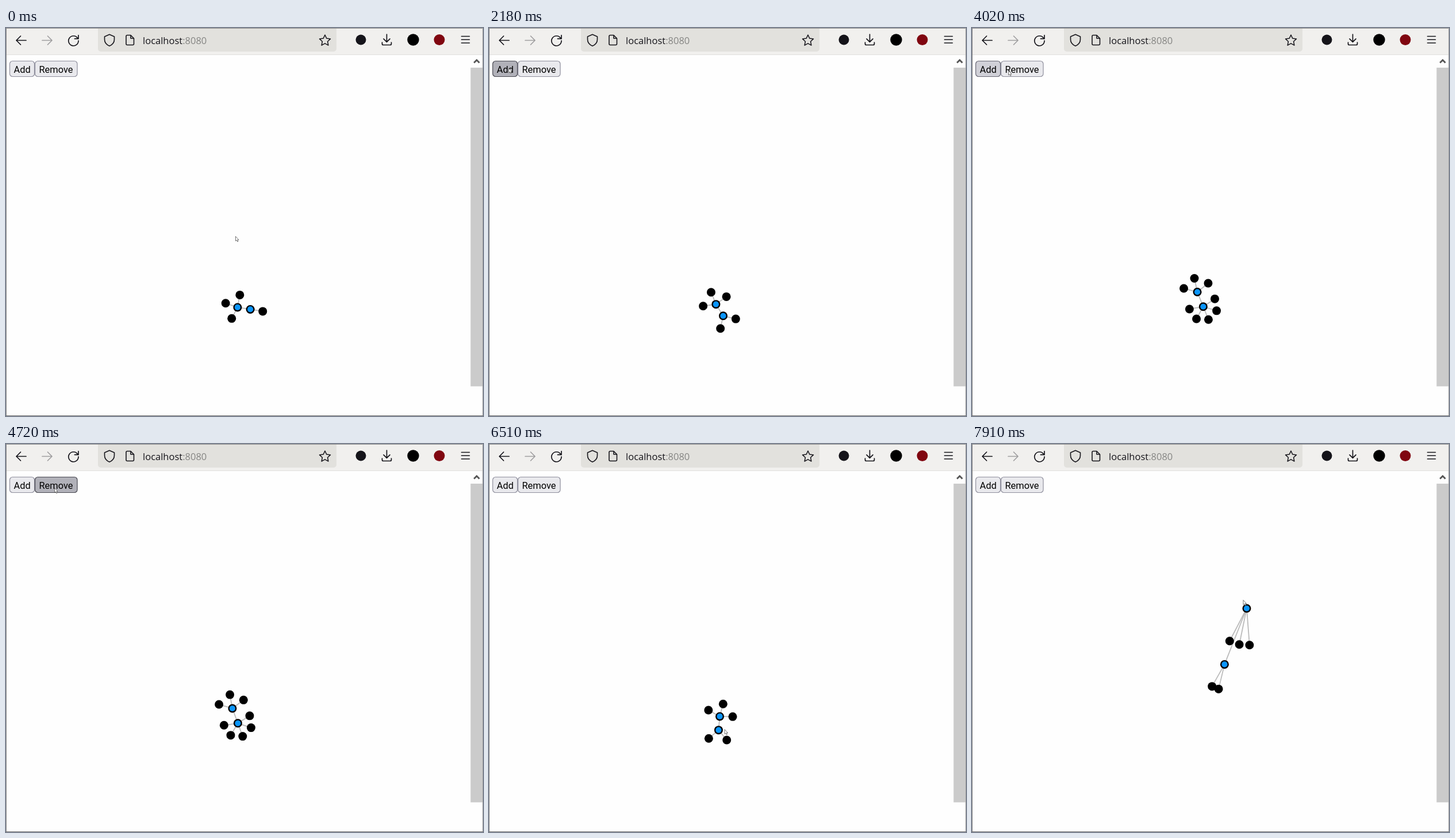
Animation of 830x675 px, one loop 8 s. Source, as an HTML page with a canvas:

```html
<!DOCTYPE html>
<html lang="en">
<head>
<meta charset="utf-8">
<title>Graph</title>
<style>
html, body { margin: 0; width: 100%; height: 100%; overflow: hidden; background: #fefefe; }
canvas { display: block; width: 830px; height: 675px; }
</style>
</head>
<body>
<canvas id="stage" width="830" height="675"></canvas>
<script>
const ctx = document.getElementById('stage').getContext('2d');
const LOOP = 8000;
const STEP = 141;    // usual time between two pictures
const PRESS = 135;   // how long a button stays down
const SETTLE = 400;  // how long neighbours take to make or close a gap
const DRAG = 7630;   // the pull on the first hub starts
const INK = '#15141a';

// Pair of hubs: time, middle x, middle y, direction in degrees
const POSES = [
  [0, 414, 487.7, 9],
  [150, 414, 487.7, 9],
  [2180, 401.2, 490.7, 58],
  [3000, 393.7, 484.5, 64.5],
  [4020, 397.2, 472, 68],
  [5290, 400.5, 474, 72],
  [6510, 400.5, 485.8, 95],
  [DRAG, 388, 474, 88],
  [7910, 458.7, 334.7, 111.6]
];

// Pointer: time, x, y
const POINTER = [
  [150, 399, 362],
  [1070, 34, 69],
  [3660, 34, 70],
  [4310, 84, 76],
  [5850, 84, 76],
  [6510, 409.5, 496],
  [DRAG, 386, 458],
  [7910, 471.5, 271]
];

const ADD = { x: 6.5, w: 43, label: 'Add', from: 1000, to: 4150, clicks: [1340, 2180, 2855, 3380] };
const REMOVE = { x: 50.5, w: 73.5, label: 'Remove', from: 4150, to: 5990, clicks: [4580, 4990, 5550] };

const leaf = (add, remove) => ({
  born: add === undefined ? -LOOP : ADD.clicks[add] + PRESS,
  dies: remove === undefined ? 2 * LOOP : REMOVE.clicks[remove] + PRESS
});

// Leaves are listed clockwise
const HUBS = [
  { side: -1, turn: 10, trail: 64, leaves: [leaf(), leaf(), leaf()] },
  { side: 1, turn: 0, trail: 44, leaves: [leaf(3, 0), leaf(), leaf(0), leaf(2, 1), leaf(1, 2)] }
];

const clamp = k => Math.min(1, Math.max(0, k));
const mix = (a, b, k) => a + (b - a) * k;
const linear = k => k;
const smooth = k => k * k * (3 - 2 * k);
const sum = list => list.reduce((a, b) => a + b, 0);

// Even steps between poses
function stepTime(t) {
  const i = POSES.findIndex(p => p[0] > t);
  if (i < 0) return POSES.at(-1)[0];
  const start = POSES[i - 1][0], span = POSES[i][0] - start;
  const d = span / Math.round(span / STEP);
  return start + Math.floor((t - start) / d + 1e-6) * d;
}

function between(keys, t, ease = linear) {
  const i = keys.findIndex(k => k[0] > t);
  if (i < 0) return keys.at(-1).slice(1);
  if (i === 0) return keys[0].slice(1);
  const a = keys[i - 1], b = keys[i];
  const k = ease((t - a[0]) / (b[0] - a[0]));
  return a.slice(1).map((v, j) => mix(v, b[j + 1], k));
}

function polar([x, y], r, deg) {
  const a = deg * Math.PI / 180;
  return [x + r * Math.cos(a), y + r * Math.sin(a)];
}

// Share of a slot that a leaf takes up
const weight = (l, t) => clamp((t - l.born) / SETTLE) * (1 - clamp((t - l.dies) / SETTLE));

function layout(t) {
  const [mx, my, axis] = between(POSES, t);
  const pull = clamp((t - DRAG) / (7910 - DRAG));
  const weights = HUBS.map(h => h.leaves.map(l => weight(l, t)));
  const counts = weights.map(sum);
  const total = sum(counts);
  const gap = 17.5 + 1.25 * total + 81 * pull;
  const reach = 19.5 + 0.6 * total;

  return HUBS.map((h, i) => {
    const at = polar([mx, my], h.side * gap / 2, axis);
    const out = axis + (h.side < 0 ? 180 : 0) + h.turn;
    const spread = 360 / (counts[i] + 1.1 + 0.32 * counts[1 - i]);
    let before = -counts[i] / 2;
    const leaves = [];
    h.leaves.forEach((l, j) => {
      const w = weights[i][j], slot = before + w / 2;
      before += w;
      if (t < l.born || t >= l.dies) return;
      // A fan at rest; leaves trail behind while pulled
      const fan = polar(at, reach, out + spread * slot);
      const tail = polar(at, h.trail, axis + h.side * (h.turn + 16 * slot));
      leaves.push(fan.map((v, n) => mix(v, tail[n], pull)));
    });
    return { at, leaves };
  });
}

function rect(x, y, w, h, color) {
  ctx.fillStyle = color;
  ctx.fillRect(x, y, w, h);
}

function disc([x, y], r, color) {
  ctx.fillStyle = color;
  ctx.beginPath();
  ctx.arc(x, y, r, 0, 7);
  ctx.fill();
}

function stroke(d, color = INK, width = 1.7) {
  ctx.strokeStyle = color;
  ctx.lineWidth = width;
  ctx.stroke(new Path2D(d));
}

function text(s, x, y, font, color) {
  ctx.font = font;
  ctx.fillStyle = color;
  ctx.fillText(s, x, y);
  return x + ctx.measureText(s).width;
}

function star(center, r) {
  const points = Array.from({ length: 10 }, (_, i) => polar(center, i % 2 ? r * 0.48 : r, i * 36 - 90));
  return `M${points.join('L')}Z`;
}

function drawBrowser() {
  rect(0, 0, 830, 675, '#fefefe');
  rect(0, 0, 830, 46, '#f1f0ee');
  rect(0, 46, 830, 1, '#e0dfde');
  ctx.fillStyle = '#e2e1dd';
  ctx.beginPath();
  ctx.roundRect(160, 1, 415, 40, [0, 0, 5, 5]);
  ctx.fill();

  ctx.lineCap = ctx.lineJoin = 'round';
  stroke('M35 21.5H18M25.5 14L18 21.5L25.5 29');
  stroke('M63 21.5H80M72.5 14L80 21.5L72.5 29', '#a09fa0');
  stroke('M124.5 17.5A8.6 8.6 0 1 0 126 22M126 12.5V18.7H119.5');
  stroke('M180 11.2L188.5 15V20C188.5 25 185.3 29 180 31.2C174.7 29 171.5 25 171.5 20V15Z', INK, 1.6);
  stroke('M211 12.5H217L222.5 18V27.5Q222.5 29.5 220.5 29.5H211Q209 29.5 209 27.5V14.5Q209 12.5 211 12.5M217 12.5V18H222.5', INK, 1.6);
  stroke(star([555, 22], 10), INK, 1.5);
  stroke('M662.5 11V24M657 18.8L662.5 24.3L668 18.8M654.5 25V27.5Q654.5 29.5 656.5 29.5H668.5Q670.5 29.5 670.5 27.5V25');
  for (const y of [14.5, 20.3, 26]) stroke(`M792.5 ${y}H806.5`, INK, 1.6);
  disc([617.5, 20.5], 9, INK);
  disc([708.5, 20.5], 10.2, '#000');
  disc([754, 20.5], 9.5, '#800610');

  const font = '16.5px "Open Sans", "Noto Sans", sans-serif';
  const x = text('localhost', 238, 27.5, font, INK);
  text(':8080', x, 27.5, font, '#858583');

  rect(808.4, 69, 21, 554.4, '#cbcbcb');
  ctx.lineCap = 'butt';
  ctx.lineJoin = 'miter';
  stroke('M814.3 60.5L819 55.7L823.7 60.5', '#555', 2.8);
}

function drawFrame() {
  rect(0, 0, 830, 1, '#8b8b8b');
  rect(0, 0, 1, 675, '#858585');
  rect(829, 0, 1, 675, '#a5a5a5');
  rect(0, 674, 830, 1, '#6c6c6c');
}

function drawButton(b, t) {
  const down = b.clicks.some(c => t >= c && t < c + PRESS);
  const over = t >= b.from && t < b.to;
  ctx.fillStyle = down ? '#b1b1b9' : over ? '#d0d0d7' : '#e9e9ed';
  ctx.strokeStyle = down ? '#484851' : over ? '#676774' : '#8f8f9d';
  ctx.lineWidth = 1.2;
  ctx.beginPath();
  ctx.roundRect(b.x, 57.5, b.w, 27, 5);
  ctx.fill();
  ctx.stroke();
  text(b.label, b.x + 7, 77.7, '16.4px Roboto, "Open Sans", sans-serif', '#000');
}

function drawGraph(t) {
  const hubs = layout(t);
  const link = (a, b) => stroke(`M${a}L${b}`, '#bbb', 1.8);
  link(hubs[0].at, hubs[1].at);
  hubs.forEach(h => h.leaves.forEach(l => link(h.at, l)));
  hubs.forEach(h => {
    disc(h.at, 7.5, '#000');
    disc(h.at, 5.1, '#0a95fc');
    h.leaves.forEach(l => disc(l, 7.5, '#000'));
  });
}

function drawPointer(t) {
  ctx.save();
  ctx.translate(...between(POINTER, t, smooth));
  const arrow = new Path2D('M.5 .5V8.5L2.3 7L3.7 9.8L5 9.2L3.8 6.5H6Z');
  ctx.fillStyle = '#fff';
  ctx.fill(arrow);
  ctx.strokeStyle = '#555';
  ctx.lineWidth = 0.8;
  ctx.stroke(arrow);
  ctx.restore();
}

const begin = performance.now();

function render() {
  const t = stepTime((performance.now() - begin) % LOOP);
  drawBrowser();
  drawButton(ADD, t);
  drawButton(REMOVE, t);
  drawGraph(t);
  drawPointer(t);
  drawFrame();
  requestAnimationFrame(render);
}
render();
</script>
</body>
</html>
```
